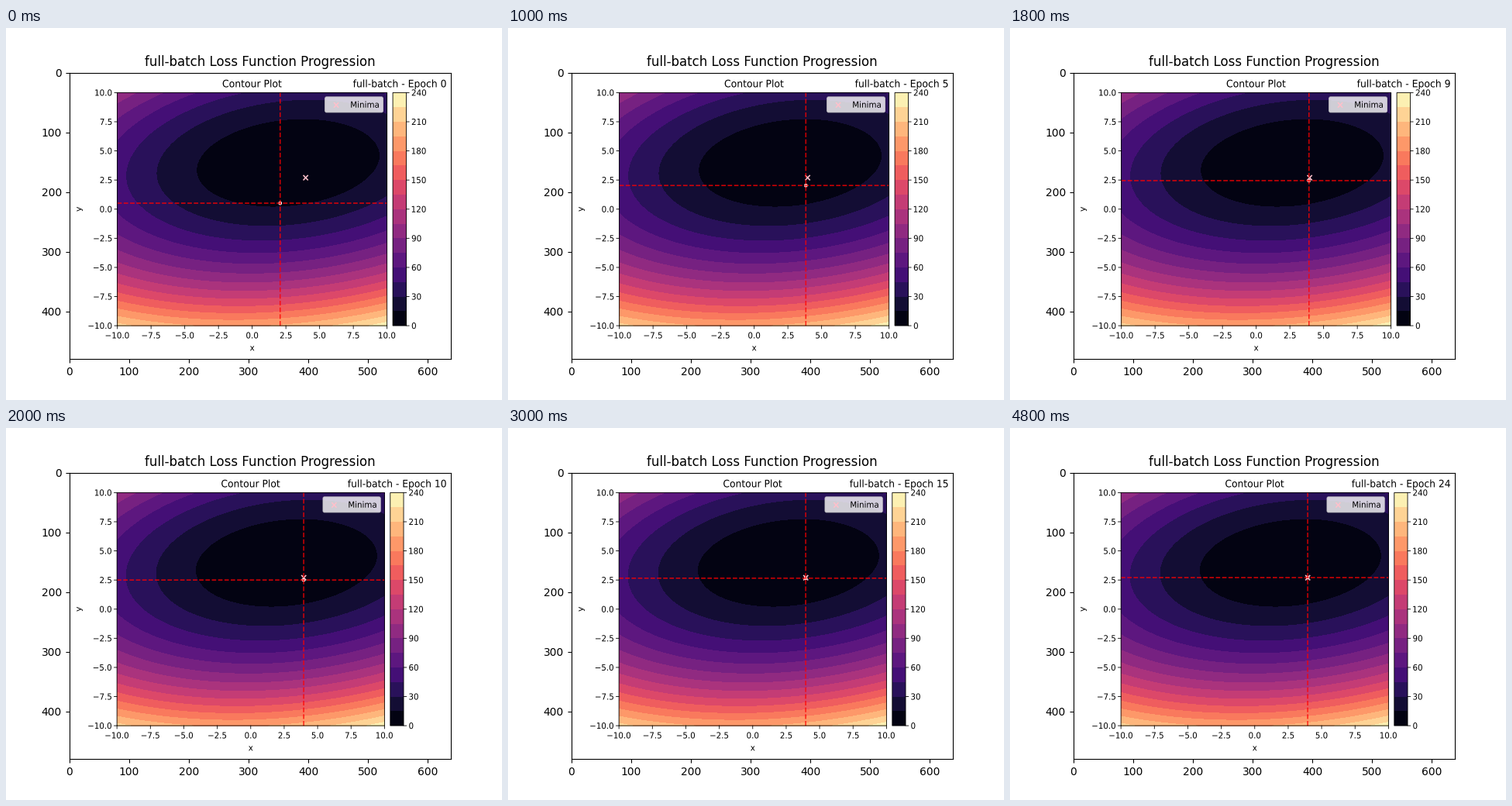
A matplotlib script for the animation above (5 s loop, 640 px wide and 480 px high).

```python
import matplotlib.pyplot as plt
import numpy as np
from matplotlib.animation import FuncAnimation
from matplotlib.patches import Circle, FancyBboxPatch, PathPatch, Rectangle
from matplotlib.textpath import TextPath
from matplotlib.transforms import Affine2D

DPI = 100
PT = DPI / 72
EM = 10 * PT
EPOCHS = 25

# Stage rectangle of the picture, and the layout inside it in panel units.
FRAME_X, FRAME_Y, FRAME_W, FRAME_H = 81.6, 52.8, 492.8, 369.6
PANEL_H = 470
LEFT, BOTTOM, PLOT_W, PLOT_H = 83.3, 54.8, 467.2, 382.4
RIGHT, TOP = LEFT + PLOT_W, BOTTOM + PLOT_H
BAR_LEFT, BAR_W = RIGHT + 10, 0.05 * PLOT_W
BAR_MID, BAR_RIGHT = BAR_LEFT + BAR_W / 2, BAR_LEFT + BAR_W
TICK = 3.5 * PT
TITLE_Y = TOP + 8.9

LEVELS = np.arange(0, 241, 15)
MINIMUM = 3.965, 2.698
UNIT_X, UNIT_Y = PLOT_W / 20, PLOT_H / 20


def to_panel(x, y):
    return LEFT + (x + 10) * UNIT_X, BOTTOM + (y + 10) * UNIT_Y


def loss(x, y):
    dx, dy = x - 2.67, y - 3.97
    return 0.9 + 0.313 * dx**2 - 0.187 * dx * dy + 1.01 * dy**2


def weights(epoch):
    """Gradient descent as a slow and a fast decaying mode."""
    slow, fast = 2.4 * 0.777**epoch, 1.58 * 0.43**epoch
    return MINIMUM[0] - 0.134 * slow - fast, MINIMUM[1] - slow + 0.134 * fast


def crosshair(epoch):
    """Panel position of the weights, rounded to whole panel pixels."""
    u, v = to_panel(*weights(epoch))
    u0, v0 = to_panel(*MINIMUM)
    return (u0 - round(u0 - u - 0.15) - 0.15,
            v0 - round(v0 - v + 0.23) + 0.23)


def text_path(text, x, y, size=10, ha="center", angle=0):
    path = TextPath((0, 0), text, size=size * PT)
    box = path.get_extents()
    shift = {"left": box.x0, "center": (box.x0 + box.x1) / 2, "right": box.x1}[ha]
    return (Affine2D().translate(-shift, 0).rotate_deg(angle)
            .translate(x, y).transform_path(path))


def epoch_title(epoch):
    template = "full-batch - Epoch " + "0" * len(str(epoch))
    start = text_path(template, BAR_MID, TITLE_Y, 12).get_extents().x0
    return text_path(f"full-batch - Epoch {epoch}", start, TITLE_Y, 12, "left")


class Panel:
    def __init__(self, fig, first_epoch):
        width = epoch_title(first_epoch).get_extents().x1 + 9
        self.sx, self.sy = FRAME_W / width, FRAME_H / PANEL_H
        self.stroke = (self.sx + self.sy) / 2
        self.ax = fig.add_axes([FRAME_X / 640, FRAME_Y / 480,
                                FRAME_W / 640, FRAME_H / 480])
        self.draw_contours()
        self.ax.set(xlim=(0, width), ylim=(0, PANEL_H))
        self.ax.axis("off")
        self.draw_axes()
        self.draw_colorbar()
        self.draw_legend()
        self.cross(*to_panel(*MINIMUM), zorder=1.6)
        self.dot = self.ax.add_patch(Circle((0, 0), 3.1, fc="white", lw=0, zorder=1.5))
        self.vline = self.dashed(self.sx, self.sy)
        self.hline = self.dashed(self.sy, self.sx)
        self.title = self.text(epoch_title(first_epoch))

    def text(self, path):
        return self.ax.add_patch(PathPatch(path, fc="black", lw=0, zorder=6))

    def line(self, xs, ys, width=0.8, **style):
        style = {"color": "black", "zorder": 4, **style}
        self.ax.plot(xs, ys, lw=width * self.stroke, snap=False, **style)

    def outline(self, x, y, w, h):
        self.ax.add_patch(Rectangle((x, y), w, h, fill=False, ec="black", zorder=4,
                                    lw=0.8 * self.stroke, snap=False))

    def cross(self, u, v, zorder, alpha=1):
        r = 3 * PT
        for s in (-1, 1):
            self.line([u - r, u + r], [v - s * r, v + s * r], 1.5, color="pink",
                      zorder=zorder, alpha=alpha, solid_capstyle="butt")

    def dashed(self, across, along):
        k = along / across
        return self.ax.plot([], [], color="red", alpha=0.8, lw=1.5 * across,
                            ls=(0, (3.7 * k, 1.6 * k)), snap=False, zorder=2)[0]

    def draw_contours(self):
        x, y = np.meshgrid(np.linspace(-10, 10, 200), np.linspace(-10, 10, 200))
        self.ax.contourf(*to_panel(x, y), loss(x, y), levels=LEVELS,
                         cmap="magma", zorder=1)

    def draw_axes(self):
        self.outline(LEFT, BOTTOM, PLOT_W, PLOT_H)
        for value in np.arange(-10, 10.1, 2.5):
            u, v = to_panel(value, value)
            name = f"{value:.1f}".replace("-", "\u2212")
            self.line([u, u], [BOTTOM - TICK, BOTTOM])
            self.line([LEFT - TICK, LEFT], [v, v])
            self.text(text_path(name, u, BOTTOM - 20.8))
            self.text(text_path(name, LEFT - 2 * TICK, v - 0.365 * EM, ha="right"))
        mid_x, mid_y = to_panel(0, 0)
        self.text(text_path("x", mid_x, 13.8))
        self.text(text_path("y", 20.6, mid_y, angle=90))
        self.text(text_path("Contour Plot", mid_x, TITLE_Y, 12))

    def draw_colorbar(self):
        edges = BOTTOM + LEVELS / 240 * PLOT_H
        middles = (LEVELS[:-1] + LEVELS[1:]) / 2
        self.ax.pcolormesh([BAR_LEFT, BAR_RIGHT], edges, middles[:, None],
                           cmap="magma", vmin=0, vmax=240, zorder=1)
        self.outline(BAR_LEFT, BOTTOM, BAR_W, PLOT_H)
        for value, v in zip(LEVELS[::2], edges[::2]):
            self.line([BAR_RIGHT, BAR_RIGHT + TICK], [v, v])
            self.text(text_path(str(value), BAR_RIGHT + 2 * TICK,
                                v - 0.365 * EM, ha="left"))

    def draw_legend(self):
        w, h = 100.5, 25.4
        x, y = RIGHT - 0.5 * EM - w, TOP - 0.5 * EM - h
        self.ax.add_patch(FancyBboxPatch(
            (x, y), w, h, boxstyle=f"round,pad=0,rounding_size={0.2 * EM}",
            fc="white", ec="0.8", alpha=0.8, lw=self.stroke, zorder=5))
        self.cross(x + 1.4 * EM, y + 12, zorder=5.5)
        self.text(text_path("Minima", x + 3.25 * EM, y + 7.8, ha="left"))

    def show(self, epoch):
        u, v = crosshair(epoch)
        self.dot.center = u, v
        self.vline.set_data([u, u], [BOTTOM, TOP])
        self.hline.set_data([LEFT, RIGHT], [v, v])
        self.title.set_path(epoch_title(epoch))


fig, outer = plt.subplots(figsize=(6.4, 4.8), dpi=DPI)
outer.set(xlim=(-0.5, 639.5), ylim=(479.5, -0.5), aspect="equal",
          title="full-batch Loss Function Progression")

# Two-digit epochs have a wider title, which narrows the whole panel.
panels = [Panel(fig, 0), Panel(fig, 10)]


def update(epoch):
    current = panels[epoch >= 10]
    for panel in panels:
        panel.ax.set_visible(panel is current)
    current.show(epoch)


anim = FuncAnimation(fig, update, frames=EPOCHS, interval=200,
                     repeat=True, repeat_delay=0)
plt.show()
```
